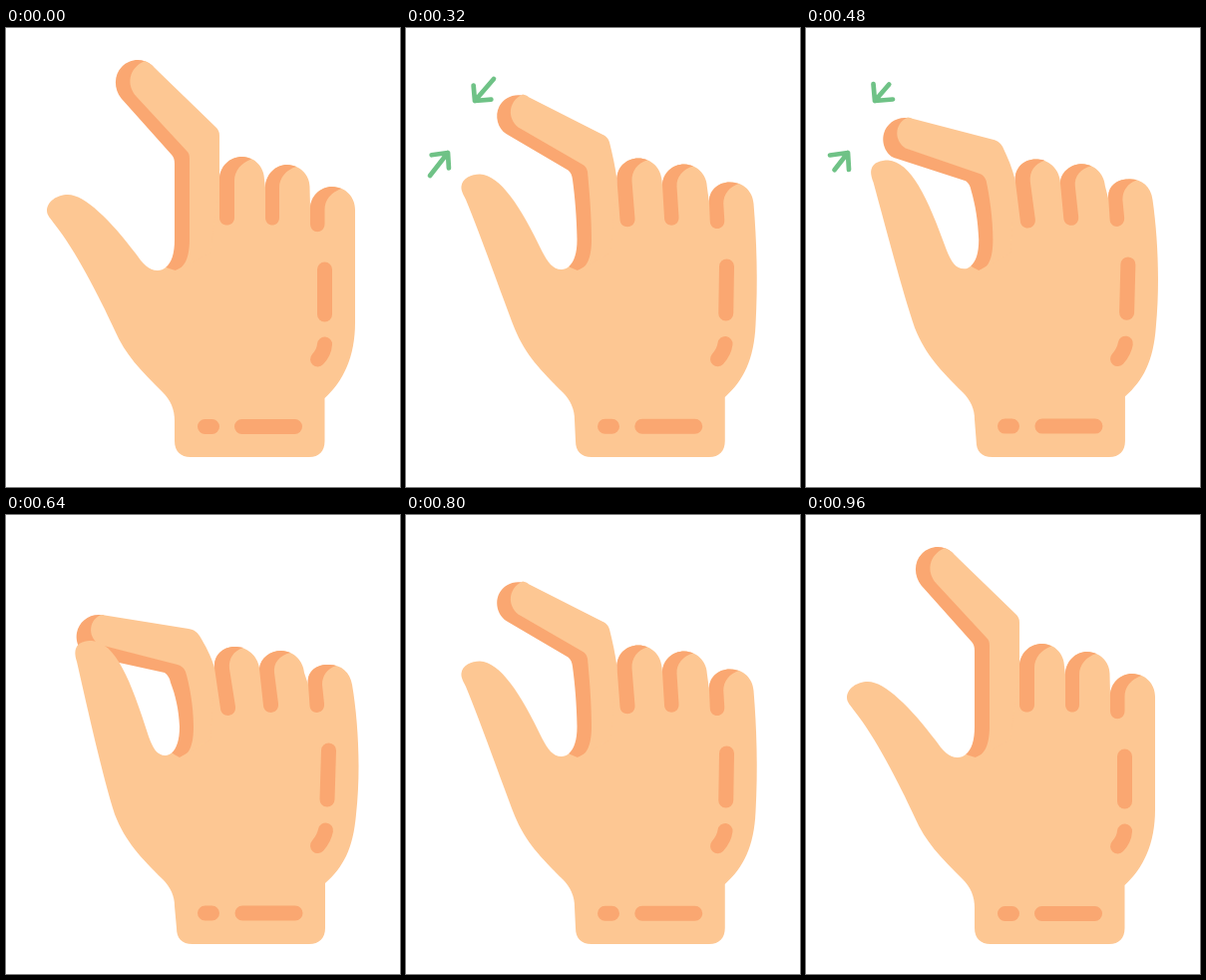
An HTML page that plays this animation: 395 by 460 pixels, repeating every 1.04 s.

```html
<!DOCTYPE html>
<html lang="en">
<head>
<meta charset="utf-8">
<title>Pinch gesture</title>
<style>
  html, body { margin: 0; width: 100%; height: 100%; overflow: hidden; background: #fff; }
  svg { display: block; width: 100vw; height: 100vh; }
</style>
</head>
<body>
<svg id="stage" viewBox="0 0 395 460"></svg>
<script>
const LOOP = 1040, STEP = 40, CLOSED = 640, OPEN = 960;
const SKIN = '#fdc793', SHADE = '#faa771', GREEN = '#6fc286';
const stage = document.getElementById('stage');

function addPath(attrs) {
  const el = document.createElementNS('http://www.w3.org/2000/svg', 'path');
  for (const key in attrs) el.setAttribute(key, attrs[key]);
  stage.appendChild(el);
  return el;
}
const fill = color => ({ fill: color });
const stroke = (color, width) => ({
  fill: 'none', stroke: color, 'stroke-width': width,
  'stroke-linecap': 'round', 'stroke-linejoin': 'round'
});

// Each part: style, open pose, closed pose (same commands in both).
const parts = [
  // index finger, shaded side
  [fill(SHADE),
    'M160 240 C166 235 169 226 169 212 C169 185 169 160 169 136 C169 132 168 129 166 127 L115.5 70.5 C108 61 108 47 116 39 C125 30 138 30 147 38 L190 110 L190 243 L170 246Z',
    'M166 238.5 C171 234 174 226 174 212 C173 194 170 181 165 168 C164 163 162 160 159 158 L86 142 C76 141 69 129 71 118 C73 107 83 99 95 100 L182 130 L195 240 L174 246Z'],
  // index finger, lit side
  [fill(SKIN),
    'M139 33 C142 34 145 36 147 38 L210 99 C213 102 214 104 214 108 C214 122 214 137 214 152 L214 175 L205 255 L170 243 C181 240 184 226 184 212 C184 185 184 160 184 131 C184 127 183 125 181 123 L131 69 C120 57 123 40 139 33Z',
    'M95 100 C97 100 98 100 99 100.5 L183 114 C189 115 192 118 194 121 C200 131 206 142 209 153 L212 178 L205 255 L174 243 C185 241 188 228 188 212 C188 192 184 170 180 157 C178 153 176 151 172 150 L94 130 C83 124 81 107 95 100Z'],
  // palm, thumb and folded fingers
  [fill(SKIN),
    `M152 243 C155 243 158 242 160 240 L170 243 L205 225 L214 152
     C214 139 224 129 237 129 C249 129 259 139 259 152
     L260 160 C260 147 270 137 282 137 C294 137 304.5 147 304.5 159
     L305 181 C305 169 315 159 327 159 C340 159 350 169 350 182
     C350 220 350 255 350 295 C350 330 338 354 319.5 371
     L319.5 414 C319.5 424 314 430 304 430 L185 430 C175 430 169 424 169 414
     L169 394 C169 382 165 373 157 365 C135 343 120 328 109 303
     C93 268 69 222 49 197 C45 191 41 188 41 183 C41 174 51 167 62 167
     C79 167 105 193 130 226 C137 236 143 243 152 243Z`,
    `M160 241 C162 241 164 240 166 238.5 L174 243 L205 225 L209 153
     C208 141 217 132 229 132 C242 132 252 141 254 153
     L254 154 C255 143 265 136 276 136 C288 136 298 146 299 158
     L303 170 C301 158 310 150 322 150 C335 149 345 157 347 170
     C353 205 356 255 351 300 C348 335 338 353 320 369
     L320 414 C320 424 314 430 304 430 L187 430 C176 430 171 424 171 414
     L169 392 C169 382 165 373 157 365 C135 343 120 328 109 300
     C97 262 83 200 71 147 C69 141 69 137 70 134 C72 127 80 126 86 126
     C110 128 125 165 143 222 C147 233 151 241 160 241Z`],
  // finger shades
  [fill(SHADE),
    'M214 152 C214 139 224 129 237 129 C240 129 243 130 246 131.5 C236 135 229 143 229 153 L229 190 C229 200 214 200 214 190Z',
    'M209 153 C208 141 217 132 229 132 C232 132 235 132 238 133 C228 136 223 144 224 154 L230 192 C231 203 216 204 215 194Z'],
  [fill(SHADE),
    'M260 160 C260 147 270 137 282 137 C285 137 288 138 291 139 C281 142 274 150 274 160 L274 190 C274 200 260 200 260 190Z',
    'M254 154 C255 143 265 136 276 136 C279 136 282 137 285 138 C274 141 268 148 269 158 L273 189 C274 200 259 201 258 191Z'],
  [fill(SHADE),
    'M305 181 C305 169 315 159 327 159 C330 159 333 160 336 161 C326 165 319.5 172 319.5 182 L319.5 196 C319.5 207 305 207 305 196Z',
    'M303 170 C301 158 310 150 322 150 C325 150 328 150 331 151 C322 154 317 161 317 170 L319 189 C320 200 305 201 304.5 191Z'],
  // creases
  [stroke(SHADE, 15), 'M319.5 242 L319.5 287', 'M323.5 236 L322 285'],
  [stroke(SHADE, 15), 'M319.5 317 Q319 325 312.5 332', 'M320.5 316 Q319 324 312.5 331.5'],
  [stroke(SHADE, 15), 'M199.5 399.5 L206.5 399.5 M236.5 399.5 L289.5 399.5',
    'M199.5 399 L206.5 399 M237 399 L290 399']
].map(([style, open, closed]) => ({
  el: addPath(style), open, closed: closed.match(/[\d.]+/g).map(Number)
}));

const arrows = [
  { tail: [88, 51], tip: [69, 73], arms: [[67.5, 56], [87, 71.5]] },
  { tail: [24, 148], tip: [42, 125], arms: [[24, 127.5], [43, 142]] }
];
for (const arrow of arrows) arrow.el = addPath(stroke(GREEN, 4.7));

const ramp = (t, from, to) => Math.min(1, Math.max(0, (t - from) / (to - from)));
const ease = x => x * x * (3 - 2 * x);
const mix = (a, b, k) => a + (b - a) * k;
const between = (a, b, k) => [mix(a[0], b[0], k), mix(a[1], b[1], k)];

function morph({ open, closed }, k) {
  let i = 0;
  return open.replace(/[\d.]+/g, n => mix(+n, closed[i++], k).toFixed(2));
}

function arrowPath({ tail, tip, arms }, t) {
  const start = ramp(t, 440, 600), end = ramp(t, 80, 200);
  const head = ramp(t, 220, 330) - ramp(t, 560, 640);
  let d = '';
  if (end > start) d += `M${between(tail, tip, start)} L${between(tail, tip, end)}`;
  if (head > 0) {
    const [a, b] = arms.map(arm => between(tip, arm, head));
    d += `M${a} L${tip} L${b}`;
  }
  return d;
}

function draw(time) {
  const t = Math.floor((time % LOOP) / STEP) * STEP;
  const pinch = t <= CLOSED ? ease(t / CLOSED) : 1 - ease(ramp(t, CLOSED, OPEN));
  for (const part of parts) part.el.setAttribute('d', morph(part, pinch));
  for (const arrow of arrows) arrow.el.setAttribute('d', arrowPath(arrow, t));
}

const begin = performance.now();
function tick() {
  draw(performance.now() - begin);
  requestAnimationFrame(tick);
}
tick();
</script>
</body>
</html>
```
